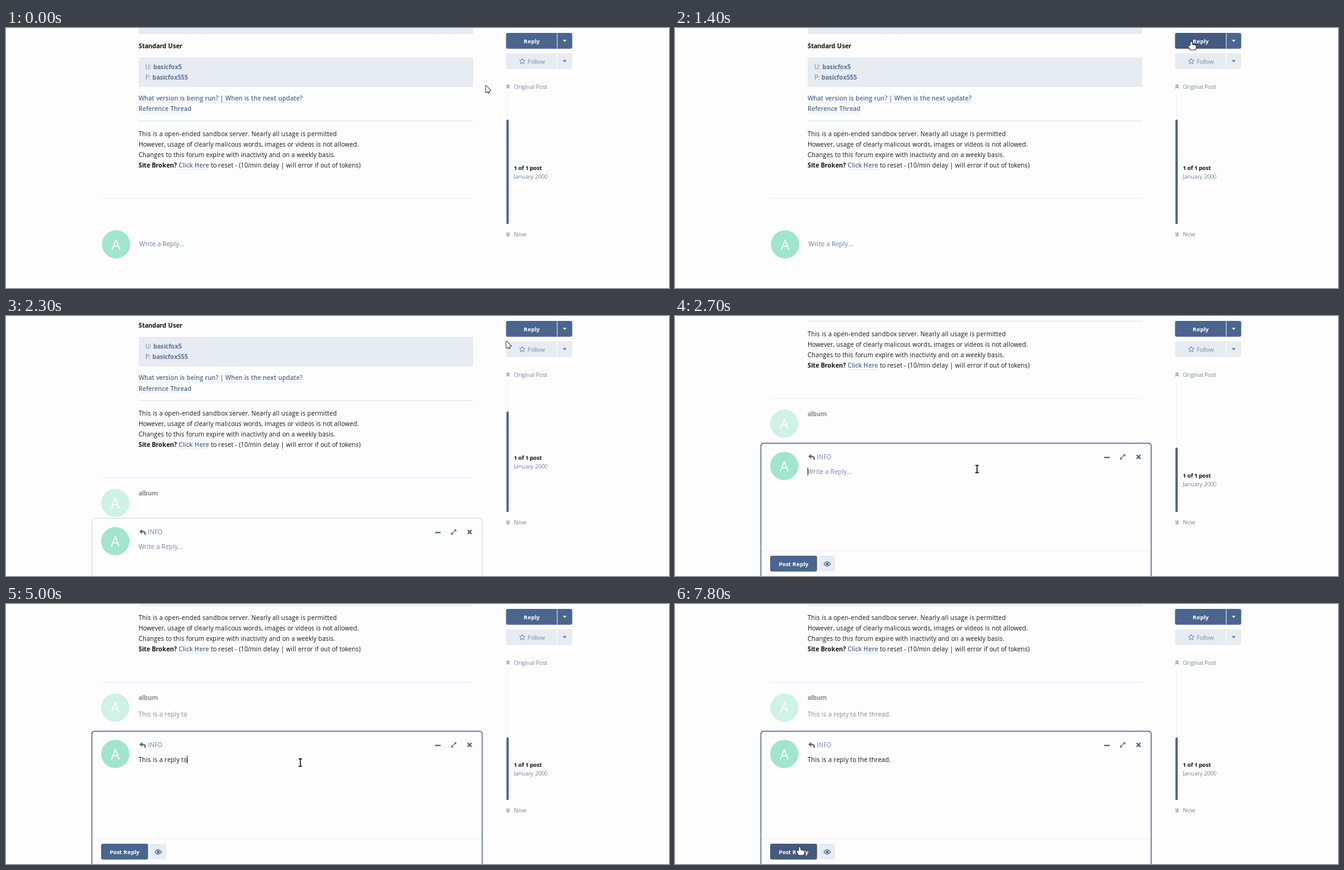
Write an HTML page with a canvas that moves like this. It is 1080 px wide and 423 px high and loops after 8000 ms.

```html
<!DOCTYPE html>
<html lang="en">
<head>
<meta charset="utf-8">
<title>Forum reply</title>
<style>
  html, body { margin: 0; width: 100%; height: 100%; overflow: hidden; background: #fefdfe; }
  canvas { display: block; width: 1080px; height: 423px; }
</style>
</head>
<body>
<canvas id="stage" width="1080" height="423"></canvas>
<script>
const ctx = document.getElementById('stage').getContext('2d');
const LOOP = 8000;
const ZOOM = 0.7175; // the page is shown scaled down
const LINE = 23.8 * ZOOM;
const LEFT = 216, RIGHT = 761, SIDE = 827.3;
const BG = '#fefdfe', INK = '#141414', BLUE = '#4a658f', HOVER = '#435a7e';
const MUTED = '#6f83a0', PALE = '#e7ebf2', RULE = '#dfe5ee', LINK = '#4d698e';
const MINT = '#a0e5cd', FADED_MINT = '#cff2e6';
const USER = 'album', LOGIN = 'basicfox5', MESSAGE = 'This is a reply to the thread.';
const RULES = [
  'This is a open-ended sandbox server. Nearly all usage is permitted',
  'However, usage of clearly malicous words, images or videos is not allowed.',
  'Changes to this forum expire with inactivity and on a weekly basis.',
];
const PREVIEW_AT = 2000, FOCUS_AT = 2430, CARET_OFF = 7500;

// pointer glides: start, end, target
const GLIDES = [
  [150, 1050, 841, 23],
  [2230, 2650, 492, 249],
  [2750, 3000, 479.5, 258],
  [6550, 7500, 203, 396],
];
// typing bursts: start, ms per key, keys
const BURSTS = [[3300, 1, 1], [3700, 83, 13], [4900, 33, 4], [5600, 72, 12]];

const clamp = (v, lo, hi) => Math.min(hi, Math.max(lo, v));
const mix = (a, b, u) => a + (b - a) * u;

function ramp(t, from, to) {
  const u = clamp((t - from) / (to - from), 0, 1);
  return u * u * (3 - 2 * u);
}

function pointerAt(t) {
  let x = 781, y = 93;
  for (const [from, to, tx, ty] of GLIDES) {
    const u = ramp(t, from, to);
    x = mix(x, tx, u);
    y = mix(y, ty, u);
  }
  return [x, y];
}

function typedAt(t) {
  let keys = 0;
  for (const [start, step, count] of BURSTS)
    keys += clamp(Math.floor((t - start) / step) + 1, 0, count);
  return MESSAGE.slice(0, keys);
}

// Glyphs advance by whole page pixels; returns the end of the run.
function text(str, x, y, { color = INK, weight = 400, size = 14 } = {}) {
  let pen = 0;
  ctx.save();
  ctx.translate(x, y);
  ctx.scale(ZOOM, ZOOM);
  ctx.font = `${weight} ${size}px "Open Sans", sans-serif`;
  ctx.fillStyle = color;
  for (const ch of str) {
    ctx.fillText(ch, pen, 0);
    pen += Math.round(ctx.measureText(ch).width);
  }
  ctx.restore();
  return x + pen * ZOOM;
}

const bold = (str, x, y, color = INK, size = 14) => text(str, x, y, { color, size, weight: 700 });
const muted = (str, x, y, size = 14) => text(str, x, y, { color: MUTED, size });

function link(str, x, y) {
  const end = text(str, x, y, { color: LINK, weight: 600 });
  rect(x, y + 3, end - x, 0.9, RULE);
  return end;
}

function rect(x, y, w, h, color) {
  ctx.fillStyle = color;
  ctx.fillRect(x, y, w, h);
}

function box(x, y, w, h, r, color) {
  ctx.fillStyle = color;
  ctx.beginPath();
  ctx.roundRect(x, y, w, h, r);
  ctx.fill();
}

function disc(x, y, r, color) {
  ctx.fillStyle = color;
  ctx.beginPath();
  ctx.arc(x, y, r, 0, 7);
  ctx.fill();
}

function stroke(color, width, points) {
  if (points) {
    ctx.beginPath();
    points.forEach(p => ctx.lineTo(...p));
  }
  ctx.strokeStyle = color;
  ctx.lineWidth = width;
  ctx.stroke();
}

function fill(color, points) {
  ctx.beginPath();
  points.forEach(p => ctx.lineTo(...p));
  ctx.closePath();
  ctx.fillStyle = color;
  ctx.fill();
}

// Isosceles triangle around (x, y), turned by a.
function triangle(x, y, half, height, a, color) {
  ctx.save();
  ctx.translate(x, y);
  ctx.rotate(a);
  fill(color, [[-half, -height / 2], [half, -height / 2], [0, height / 2]]);
  ctx.restore();
}

function avatar(x, y, color = MINT) {
  disc(x, y, 23, color);
  text('A', x - 7.2, y + 8.6, { color: '#fff', size: 32 });
}

function codeBox(bottom) {
  const h = 47.5, y = bottom - h;
  box(LEFT, y, RIGHT - LEFT, h, 2, PALE);
  ctx.setLineDash([1, 1]);
  for (const edge of [y + 0.5, bottom - 0.5])
    stroke('#dbe1ea', 1, [[LEFT + 1, edge], [RIGHT - 1, edge]]);
  ctx.setLineDash([]);
}

function credential(label, value, y) {
  bold(value, muted(label + ': ', 227, y), y, '#5b7599');
}

function drawPost(scroll, replying, typed) {
  ctx.save();
  ctx.translate(0, -scroll);
  codeBox(9.5);
  bold('Standard User', LEFT, 33);
  codeBox(95.5);
  credential('U', LOGIN, 66.6);
  credential('P', LOGIN + '55', 66.6 + LINE);
  link('What version is being run? | When is the next update?', LEFT, 118.2);
  link('Reference Thread', LEFT, 118.2 + LINE);
  rect(LEFT, 150.6, RIGHT - LEFT, 1.4, RULE);

  RULES.forEach((rule, i) => text(rule, LEFT, 175.5 + i * LINE));
  const y = 175.5 + 3 * LINE;
  const end = link('Click Here', bold('Site Broken? ', LEFT, y), y);
  text(' to reset - (10/min delay | will error if out of tokens)', end, y);
  rect(155, 276.6, RIGHT - 155, 0.9, '#e2e7ef');

  if (replying) {
    avatar(178, 318, FADED_MINT);
    ctx.globalAlpha = 0.5;
    bold(USER, LEFT, 305.4);
    text(typed, LEFT, 332.3);
  } else {
    avatar(179.3, 352);
    muted('Write a Reply...', 217, 354.8, 15);
  }
  ctx.restore();
}

function splitButton(y, color, sideColor, arrowColor) {
  box(814.5, y, 83, 25.8, [3, 0, 0, 3], color);
  box(898.4, y, 24, 25.8, [0, 3, 3, 0], sideColor);
  triangle(910, y + 13, 3.2, 3.5, 0, arrowColor);
}

function star(x, y) {
  ctx.beginPath();
  for (let i = 0; i < 10; i++) {
    const r = i % 2 ? 2.3 : 4.7, a = i * Math.PI / 5;
    ctx.lineTo(x + r * Math.sin(a), y - r * Math.cos(a));
  }
  ctx.closePath();
  stroke(MUTED, 1);
}

function endLink(label, y, dir) {
  const x = 817.8, rise = 1.2 * dir;
  for (const cy of [y - 1.6, y + 1.6])
    stroke(MUTED, 1.1, [[x - 2.6, cy + rise], [x, cy - rise], [x + 2.6, cy + rise]]);
  muted(label, SIDE, y + 3.7, 13);
}

function drawSidebar(scroll, hover) {
  splitButton(8, hover ? HOVER : BLUE, BLUE, '#fff');
  bold('Reply', 843.3, 24.7, '#fff', 13);
  splitButton(41, PALE, PALE, '#5f7391');
  star(841, 54.2);
  muted('Follow', 849.7, 57.7, 13);

  endLink('Original Post', 95.4, 1);
  endLink('Now', 335.6, -1);
  const top = 149 + scroll * 0.455, bottom = 319, mid = (top + bottom) / 2;
  rect(816.6, 108, 0.9, bottom - 108, PALE);
  box(815.2, top, 3.7, bottom - top, 2, BLUE);
  bold('1 of 1 post', SIDE, mid - 3, INK, 13);
  muted('January 2000', SIDE, mid + 10.6, 13);
}

function replyIcon(x, y) {
  triangle(x - 3, y - 0.8, 4, 4.6, Math.PI / 2, LINK);
  ctx.beginPath();
  ctx.moveTo(x - 2, y - 0.8);
  ctx.quadraticCurveTo(x + 5.5, y - 1.4, x + 4, y + 4.6);
  stroke(LINK, 2.2);
}

function expandIcon(x, y) {
  stroke(LINK, 1.2, [[x - 3, y + 3], [x + 3, y - 3]]);
  triangle(x + 3.2, y - 3.2, 2.8, 2.8, -Math.PI * 3 / 4, LINK);
  triangle(x - 3.2, y + 3.2, 2.8, 2.8, Math.PI / 4, LINK);
}

function closeIcon(x, y) {
  for (const s of [-3.2, 3.2]) stroke(LINK, 2.2, [[x - 3.2, y - s], [x + 3.2, y + s]]);
}

function eyeIcon(x, y) {
  ctx.beginPath();
  ctx.moveTo(x - 5.5, y);
  ctx.quadraticCurveTo(x, y - 7.5, x + 5.5, y);
  ctx.quadraticCurveTo(x, y + 7.5, x - 5.5, y);
  stroke(LINK, 1.1);
  disc(x, y, 2.2, LINK);
}

function drawComposer(top, t, typed, hover) {
  const focused = t >= FOCUS_AT, ring = 2 * ZOOM;
  ctx.save();
  ctx.translate(0, top);
  box(139.2, -0.8, 637.2, 300, 5, focused ? BLUE : '#dcdde0');
  box(139.2 + ring, ring - 0.8, 637.2 - 2 * ring, 300, 4, BG);
  avatar(178, 37);
  replyIcon(222.5, 22.3);
  muted('INFO', 231.3, 26);
  rect(699, 22, 9, 2.2, LINK);
  expandIcon(729.2, 22.2);
  closeIcon(755.2, 22.2);

  if (!typed) muted('Write a Reply...', LEFT, 49.7);
  const caret = text(typed, LEFT, 49.7);
  if (focused && t < CARET_OFF) rect(caret - 0.2, 39.5, 1, 13, INK);

  rect(141, 174.7, 634, 0.9, PALE);
  box(155, 183, 76.5, 25.8, 3, hover ? HOVER : BLUE);
  bold('Post Reply', 169, 199.8, '#fff', 13);
  box(235, 183, 25.8, 25.8, 3, PALE);
  eyeIcon(248, 196.2);
  ctx.restore();
}

function hand() {
  ctx.beginPath();
  ctx.roundRect(-1.4, -0.5, 2.9, 9, 1.4);
  for (let i = 1; i < 4; i++) ctx.roundRect(-1.4 + 2.2 * i, 3.4 + 0.5 * i, 2.4, 6, 1.2);
  ctx.roundRect(-4.6, 5.6, 4, 3.4, 1.6);
  ctx.roundRect(-2.8, 6.6, 10, 5.8, 2);
  stroke('#111', 1.8);
  ctx.fillStyle = '#fff';
  ctx.fill();
}

function beam() {
  for (const [color, width] of [['#fff', 3], ['#111', 1.6]]) {
    stroke(color, width, [[0, -6], [0, 6]]);
    for (const y of [-6, 6]) stroke(color, width, [[-2.8, y], [2.8, y]]);
  }
}

function arrow() {
  const tail = [[3.6, 8], [5.9, 13]], head = [[0.6, 0.6], [0.6, 11.6], [8.4, 8.5]];
  stroke('#111', 3.2, tail);
  stroke('#111', 1.5, [...head, head[0]]);
  fill('#fff', head);
  stroke('#fff', 1.4, [tail[0], [5.5, 12.2]]);
}

function draw(t) {
  const [x, y] = pointerAt(t);
  const scroll = 142.8 * ramp(t, 2230, 2600) + 6.5 * ramp(t, 3280, 3380);
  const top = mix(430, 207, ramp(t, 2170, 2450));
  const typed = typedAt(t);
  const replying = t >= PREVIEW_AT;
  const within = (l, u, r, b) => x >= l && x < r && y >= u && y < b;
  const onReply = within(814, 8, 898, 34);
  const onPost = replying && within(155, top + 183, 232, top + 209);
  const onFollow = within(814, 41, 922, 67);
  const inEditor = replying && within(LEFT, top + 33, RIGHT, top + 175);

  rect(0, 0, 1080, 423, BG);
  drawPost(scroll, replying, typed);
  drawSidebar(scroll, onReply);
  if (replying) drawComposer(top, t, typed, onPost);

  ctx.save();
  ctx.translate(x, y);
  const pointer = onReply || onPost || onFollow ? hand : inEditor ? beam : arrow;
  pointer();
  ctx.restore();
}

const start = performance.now();
function tick() {
  draw((performance.now() - start) % LOOP);
  requestAnimationFrame(tick);
}
tick();
</script>
</body>
</html>
```
